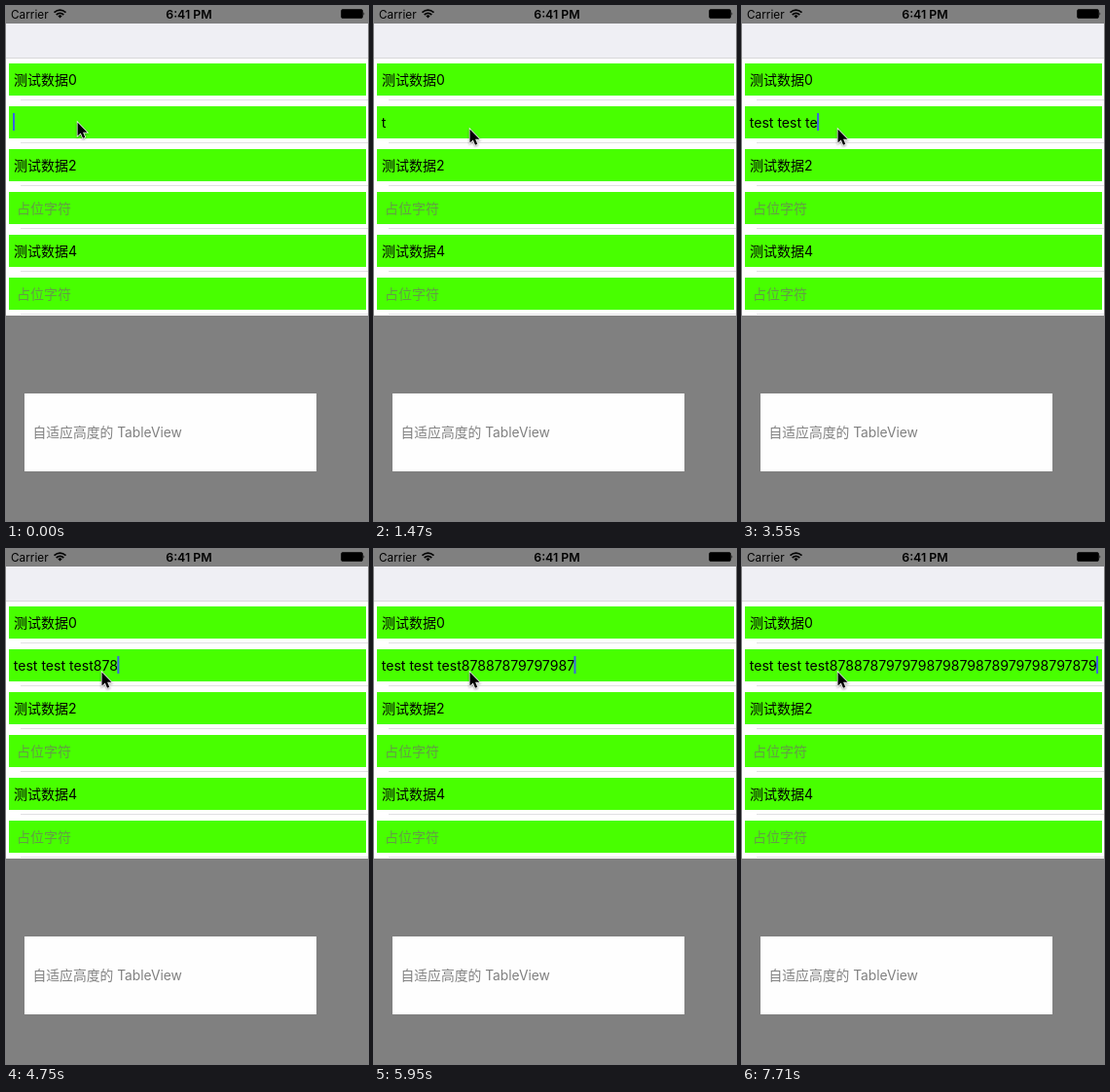
An HTML page that plays this animation: 372x529 px, repeating every 8000 ms.

```html
<!DOCTYPE html>
<html lang="zh-CN">
<head>
<meta charset="utf-8">
<title>TableView</title>
<style>
  html, body { margin: 0; width: 100%; height: 100%; overflow: hidden; background: #808080; }
  svg { display: block; width: 372px; height: 529px; }
  text { font: 14px Inter, "Noto Sans CJK SC", "Noto Sans CJK", sans-serif; white-space: pre; }
  .hint { fill: #649c46; }
  #typed { font-size: 14.1px; }
</style>
</head>
<body>
<svg viewBox="0 0 372 529">
  <rect width="372" height="529" fill="#808080"/>

  <!-- status bar -->
  <text x="5" y="12.5" style="font-size:11.8px">Carrier</text>
  <g fill="none" stroke="#000" stroke-width="1.7">
    <path d="M49.5 6.7Q55.5 1.5 61.5 6.7M51.7 9Q55.5 5.6 59.3 9"/>
    <path d="M53.4 10.2Q55.5 8.4 57.6 10.2L55.5 12.5Z" fill="#000" stroke="none"/>
  </g>
  <text x="188" y="12.5" text-anchor="middle" style="font-size:12.4px;font-weight:600">6:41 PM</text>
  <rect x="344.5" y="3.5" width="22" height="9" rx="1.5" fill="#000" stroke="#000" stroke-opacity=".6"/>
  <path d="M367.5 6q1.6 2 0 4z"/>

  <!-- navigation bar and table -->
  <rect y="18" width="372" height="36" fill="#efeff4"/>
  <rect y="53" width="372" height="265" fill="#fff"/>
  <rect y="53" width="372" height="1" fill="#d8d8da"/>
  <g id="rows"></g>

  <!-- text box -->
  <rect x="19" y="398" width="300" height="80" fill="#fefefe"/>
  <text x="27.5" y="443" fill="#808080" style="font-size:13.8px">自适应高度的 TableView</text>

  <text id="typed" x="7.7" y="125"></text>
  <rect id="caret" y="110" width="2" height="18" fill="#3a62e8"/>
  <path id="pointer" d="M0 0V14L3.3 11L5.5 16.2L7.8 15.2L5.6 10.2H10Z"
        stroke="#fff" stroke-width="1.4" paint-order="stroke"
        style="filter:drop-shadow(0 1px 1px #0006)"/>
</svg>
<script>
const LOOP = 8000, TICK = 148.5, TICK_LEAD = 20;
const rows = ["测试数据0", "", "测试数据2", "占位字符", "测试数据4", "占位字符"];

// Typing happens in bursts: the tick it starts on, and its text.
const bursts = [
  [10, "test"], [15, " "], [17, "te"], [19, "st"],
  [22, " tes"], [27, "t"], [31, "878"], [34, "878797979879879878979798797879"]
];
const FAST = 1.6; // characters per tick on the number keys and in a double stroke
const isFast = text => text === "te" || /^\d/.test(text);

const byId = id => document.getElementById(id);
const typed = byId("typed"), caret = byId("caret"), pointer = byId("pointer");

byId("rows").innerHTML = rows.map((label, i) => {
  const y = 59 + 44 * i;
  const hint = label === "占位字符";
  return `<rect x="3" y="${y}" width="367" height="33" fill="#48ff00"/>
    <rect x="15" y="${y + 37}" width="357" height="1" fill="#e0e0e2"/>
    <text x="${hint ? 11 : 8}" y="${y + 22}" class="${hint ? "hint" : ""}">${label}</text>`;
}).join("");

function typedAt(tick) {
  return bursts.map(([start, text]) => {
    const count = Math.round((tick - start + 1) * (isFast(text) ? FAST : 1));
    return text.slice(0, Math.max(0, count));
  }).join("");
}

function draw(time) {
  const tick = Math.floor((time + TICK_LEAD) / TICK);

  typed.textContent = typedAt(tick);
  caret.setAttribute("x", 7 + typed.getComputedTextLength());
  // The caret blinks until typing is under way, then stays on.
  caret.setAttribute("opacity", tick > bursts[0][0] || tick % 7 < 3 ? 1 : 0);

  const glide = 1 - (1 - Math.min(tick / 4, 1)) ** 2;
  pointer.setAttribute("transform", `translate(${73.5 + 25 * glide} ${119.5 + 7 * glide})`);
}

const start = performance.now();
function animate() {
  draw((performance.now() - start) % LOOP);
  requestAnimationFrame(animate);
}
animate();
</script>
</body>
</html>
```
